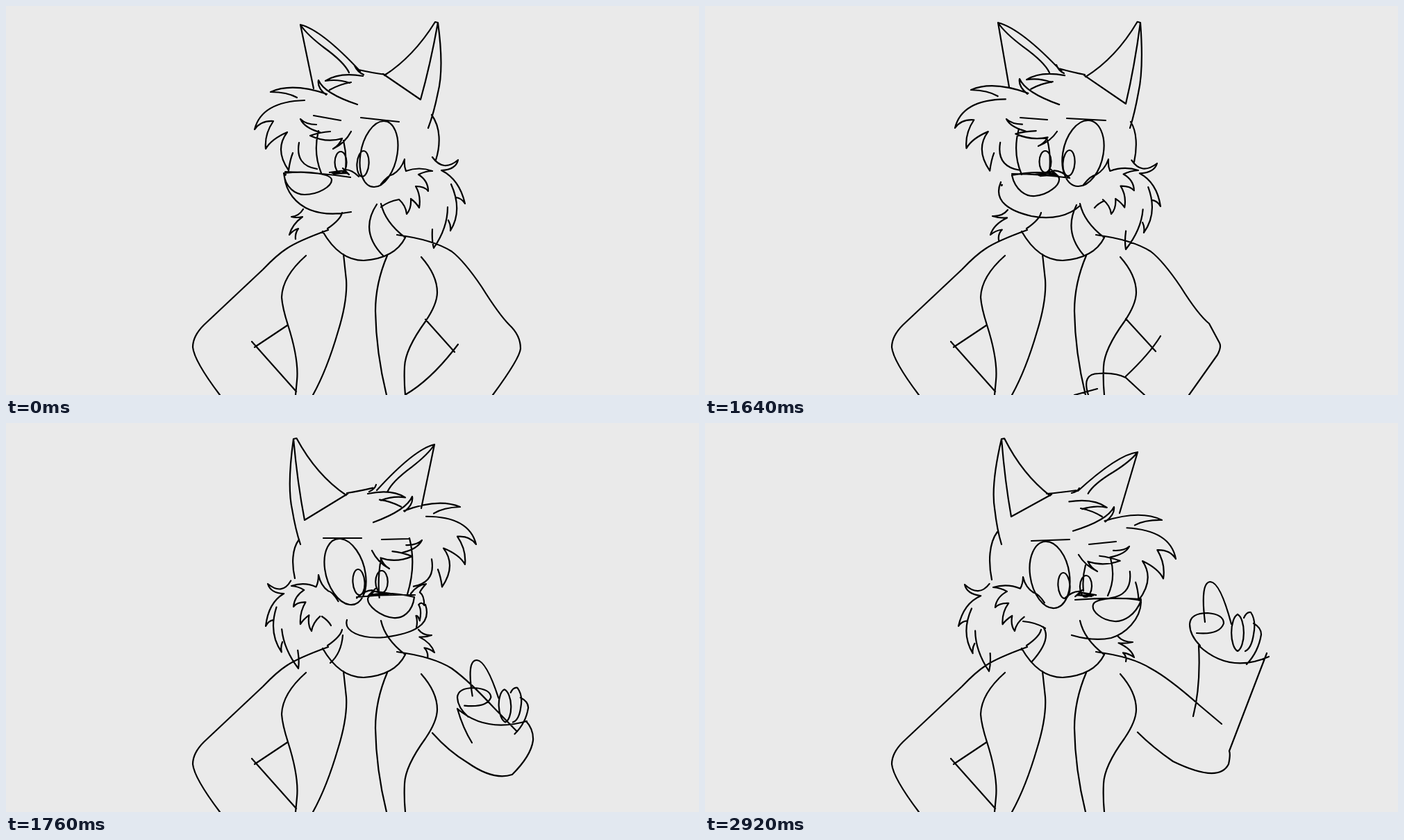
Write an HTML page with a canvas that moves like this. It is 998 px wide and 561 px high and loops after 3.72 s.

```html
<!DOCTYPE html>
<html lang="en">
<head>
<meta charset="utf-8">
<title>Fox turning its head</title>
<style>
html, body { margin: 0; height: 100%; overflow: hidden; background: #eaeaea; }
canvas { display: block; }
</style>
</head>
<body>
<canvas id="stage" width="998" height="561"></canvas>
<script>
const ctx = document.getElementById('stage').getContext('2d');
const LOOP = 3720, STEP = 40, TURN = 41, RAISE = 44, SETTLE = 5, AXIS = 1030;

const body = [
  'M484 298Q482 308 463 321M464 323Q420 339 404 350Q390 359 370 380L285 460Q269 476 269 492Q271 512 308 561',
  'M456 325Q480 367 515 367Q560 364 575 334M540 285Q546 312 575 334M563 330Q615 337 642 354',
  'M432 360Q398 390 397 420Q398 435 406 460Q422 510 419 540L417 561',
  'M486 358L490 395Q492 425 478 470Q462 525 442 561M549 360Q532 400 532 440Q533 500 548 561',
  'M598 362Q621 388 621 413Q621 430 604 455Q575 495 574 520Q573 540 575 561',
  'M406 460L358 492M354 484L418 556'
];

// Each part: shape, then anchor points per pose (left, easing, front, easing, right), then optional base anchors.
const parts = [
  // ears
  ['M443 119L424 27Q454 34 510 94M424 27Q433 41 458 60Q487 81 494 96',
    ['424 27 443 119 510 94', '422 24 438 117 514 95', '612 21 600 114 523 98', '617 31 598 123 534 97', '623 42 597 130 537 98']],
  ['M545 100Q587 73 618 23L622 24Q611 85 597 135L543 98',
    ['622 24 597 135 543 99', '627 24 606 141 546 101', '402 22 418 145 487 101', '414 23 430 140 492 103', '427 23 441 135 499 104']],
  ['M622 24Q631 90 622 125Q616 155 608 176',
    ['622 24 608 176 626 95', '627 24 612 176 628 95', '402 22 420 175 403 95', '414 23 424 175 409 95', '427 23 427 175 416 95']],
  // back of the head
  ['M613 157C626 175 626 200 619 222',
    ['613 157 619 222 624 190', '613 167 618 225 621 195', '420 172 421 224 416 195', '422 168 416 224 413 195', '421 157 413 226 410 190']],
  // crown
  ['M502 86Q506 95 515 99M508 92Q530 97 547 99',
    ['502 86 547 99 515 99', '506 85 547 99 517 97', '530 84 487 101 519 98', '533 89 491 101 523 99', '539 94 492 102 528 101']],
  // fringe
  ['M514 101Q480 95 460 108Q478 105 495 111M497 110Q480 113 466 121M461 128Q448 118 450 107Q458 126 506 142' +
   'M462 127Q412 110 381 124Q405 124 419 132M430 136Q368 138 358 178Q367 165 385 166Q372 185 374 206' +
   'Q382 192 405 182Q386 207 407 237Q409 222 413 212M422 197Q416 230 448 235',
    ['381 124 358 178 450 107', '383 121 360 176 453 105', '648 119 671 173 579 101', '654 121 677 175 585 106', '658 140 678 196 589 121']],
  ['M447 171Q432 171 424 163Q430 176 452 182M467 181Q452 182 438 187Q462 198 484 191Q480 201 471 206Q488 198 497 181',
    ['424 163 471 206 497 181', '434 163 480 202 507 181', '589 161 545 203 516 178', '599 169 552 210 527 184', '611 178 565 214 538 190']],
  // brows
  ['M443 158L482 165', ['443 158 482 165', '454 161 493 164', '569 162 529 161', '580 167 541 168', '592 171 553 175']],
  ['M511 161L566 167', ['511 161 566 167', '521 162 577 165', '500 163 445 162', '512 166 457 166', '525 168 470 170']],
  // eyes
  ['M544 166A26 48 12 0 1 530 261A26 48 12 0 1 544 166',
    ['544 166 530 261 511 222', '552 165 537 260 516 220', '471 163 487 258 508 218', '482 167 495 262 517 226', '490 171 503 267 524 226']],
  ['M515 209A8.5 18.5 4 0 1 513 246A8.5 18.5 4 0 1 515 209',
    ['515 209 513 246', '525 208 523 245', '498 205 501 242', '507 211 509 248', '516 216 518 253']],
  ['M482 210A8.5 15.5 0 0 1 482 241A8.5 15.5 0 0 1 482 210',
    ['482 210 482 241', '490 209 490 240', '534 207 534 238', '541 213 541 245', '549 220 548 251']],
  ['M450 180Q442 212 454 241M486 194Q491 215 489 236',
    ['450 180 454 241 486 194', '452 177 456 243 493 193', '578 170 575 243 532 187', '581 166 578 247 540 196', '584 195 580 249 548 205']],
  // nose and bridge
  ['M400 241C402 262 417 272 430 272C450 272 469 260 469 251C469 243 440 237 400 241',
    ['400 241 469 251 430 272', '442 244 510 249 475 274', '550 249 483 249 517 276', '588 251 521 254 558 281', '628 256 559 262 590 286']],
  ['M402 239Q450 240 496 247',
    ['402 239 496 247', '442 242 525 248', '557 245 480 245', '589 248 505 251', '628 254 533 255']],
  ['M466 240L488 237L470 241L492 241L472 242M485 234L494 243L487 238M489 236Q498 236 508 246',
    ['468 240 497 242', '478 243 512 244', '545 244 502 244', '552 246 518 248', '561 248 530 249']],
  // cheeks
  ['M540 257Q550 244 557 243Q569 236 574 221Q573 231 576 238Q595 231 614 238Q604 238 594 243Q608 252 608 267' +
   'Q603 260 590 260Q598 274 595 291Q591 284 583 278Q584 292 577 300Q576 288 566 279',
    ['574 221 614 238 577 300', '581 221 624 237 585 300', '442 217 401 236 437 297', '450 219 411 235 440 300', '458 222 415 237 446 300']],
  ['M566 279Q550 282 540 290',
    ['566 279 540 290', '575 281 561 291', '447 283 452 290', '455 279 468 292', '458 286 490 296']],
  ['M614 218Q630 240 651 222Q648 236 627 237Q653 250 661 285Q656 277 648 276M641 257Q658 295 640 324Q641 316 637 309' +
   'M636 290Q636 320 616 349Q613 338 614 322',
    ['651 222 661 285 616 349', '651 227 656 289 606 351', '380 230 380 292 436 350', '377 232 374 293 421 354', '374 233 365 293 409 358']],
  ['M428 293Q422 303 411 304Q418 306 427 304Q412 315 408 330Q414 323 421 321Q416 328 417 336',
    ['411 304 408 330 428 293', '414 303 411 330 436 294', '610 303 616 326 589 295', '613 306 617 331 594 298', '616 316 618 338 595 308']],
  ['M576 240Q592 230 617 233Q605 238 600 243Q612 250 612 266Q605 258 597 262Q606 272 600 288Q595 278 590 278Q595 288 591 297',
    ['402 243 403 243 402 244', '427 258 428 258 427 259', '576 240 617 233 591 297', '583 246 605 232 591 295', '627 256 628 256 627 257'],
    '576 240 617 233 591 297']
];

const mouth = [
  'M401 246C403 268 418 286 438 294C456 301 476 301 497 297',
  'M426 254C414 282 440 296 470 303C500 309 525 302 540 288',
  'M577 261C600 284 590 303 550 309C500 318 430 300 455 260',
  'M604 262C614 292 585 304 545 309C510 312 486 300 491 284',
  'M628 258C627 284 605 304 585 310C565 314 545 311 528 306'
];
const neck = [
  'M534 286Q508 325 544 361', 'M535 287Q516 325 545 359', 'M540 285Q541 325 558 357',
  'M485 306Q483 332 467 346', 'M487 294Q500 312 470 345'
];

const arms = [
  'M642 354Q660 368 685 405Q710 445 725 460Q741 475 741 494Q740 508 701 561M604 452L646 499M651 488L644 497Q610 540 576 560',
  'M642 354Q660 368 685 405Q710 445 726 458L741 486Q744 492 738 503L697 561M606 451L649 498M656 476Q640 502 606 534' +
    'M552 561Q542 530 567 530Q590 528 606 536L633 561M532 561L565 552',
  'M642 354Q662 370 732 453Q748 470 744 492Q735 520 690 561M610 450Q630 475 655 500M668 455Q650 480 632 510' +
    'M590 561Q600 520 632 512Q665 520 690 540',
  'M642 354Q662 370 735 448L759 479M680 430L657 464Q700 446 742 461L759 479M657 464Q636 490 637 508Q642 525 662 524' +
    'M731 458Q745 485 733 500Q727 508 710 510M735 447Q750 470 750 485Q748 510 738 512Q715 517 690 510Q655 495 612 448' +
    'M658 509Q655 535 657 561M695 503Q698 525 679 561M695 515Q705 530 715 515L716 500',
  'M642 354Q668 373 702 410L736 445M614 447Q638 474 665 490Q702 516 729 507Q756 480 759 458Q760 442 749 430' +
    'M650 412Q690 447 750 430M650 412Q658 440 671 461',
  'M642 354Q668 368 712 407L744 434M623 446Q645 468 674 488Q740 520 754 492Q757 478 755 473Q785 395 809 332' +
    'M711 321Q755 362 812 337M711 321Q714 380 703 423'
];
const hand = 'M720 287Q713 229 728 229Q742 230 758 290M713 321Q698 306 698 290Q699 274 724 274Q747 276 747 289Q741 306 708 303' +
  'M767 276A11 27 0 0 1 767 329A11 27 0 0 1 767 276M776 281Q780 272 786 273Q794 285 790 305Q787 325 778 329' +
  'M790 289Q801 295 801 305Q797 330 780 348';
const handLow = '678 342 650 396 752 406', handHigh = '728 229 698 290 801 300';

const NUM = /[\d.]+/g;

function mix(a, b, t) {
  const ends = b.match(NUM);
  let i = 0;
  return a.replace(NUM, v => +v + (ends[i++] - v) * t);
}

function mirror(s) {
  let i = 0;
  return s.replace(NUM, v => i++ % 2 ? v : AXIS - v);
}

// Two anchors give a similarity, three an affine map.
function basis(anchors, side) {
  const [x, y, a, b, c = x - side * (b - y), d = y + side * (a - x)] = anchors.match(NUM).map(Number);
  return new DOMMatrix([a - x, b - y, c - x, d - y, x, y]);
}

function addFitted(path, shape, from, to, side) {
  path.addPath(new Path2D(shape), basis(to, side).multiply(basis(from, 1).inverse()));
}

function draw(n) {
  const settle = 1 - (1 - Math.min(1, Math.max(0, (n - RAISE) / SETTLE))) ** 2.5;
  const side = n < TURN + 2 ? 1 : -1;
  const pose = k =>
    n < TURN ? k[0] :
    n === TURN ? k[1] :
    n === TURN + 1 ? mix(k[1], mirror(k[2]), 0.6) :
    n < RAISE ? k[2] : mix(k[3], k[4], settle);

  const path = new Path2D();
  const add = d => path.addPath(new Path2D(d));
  body.forEach(add);
  for (const [shape, keys, base = keys[0]] of parts) addFitted(path, shape, base, pose(keys), side);
  add(pose(mouth));
  add(pose(neck));
  add(n < RAISE ? arms[Math.max(0, n - TURN + 1)] : mix(arms[4], arms[5], settle));
  if (n >= RAISE) addFitted(path, hand, handHigh, mix(handLow, handHigh, settle), 1);

  ctx.fillStyle = '#eaeaea';
  ctx.fillRect(0, 0, 998, 561);
  ctx.lineWidth = 2.2;
  ctx.lineCap = ctx.lineJoin = 'round';
  ctx.stroke(path);
}

const start = performance.now();
function tick() {
  draw(Math.floor((performance.now() - start) % LOOP / STEP));
  requestAnimationFrame(tick);
}
tick();
</script>
</body>
</html>
```
